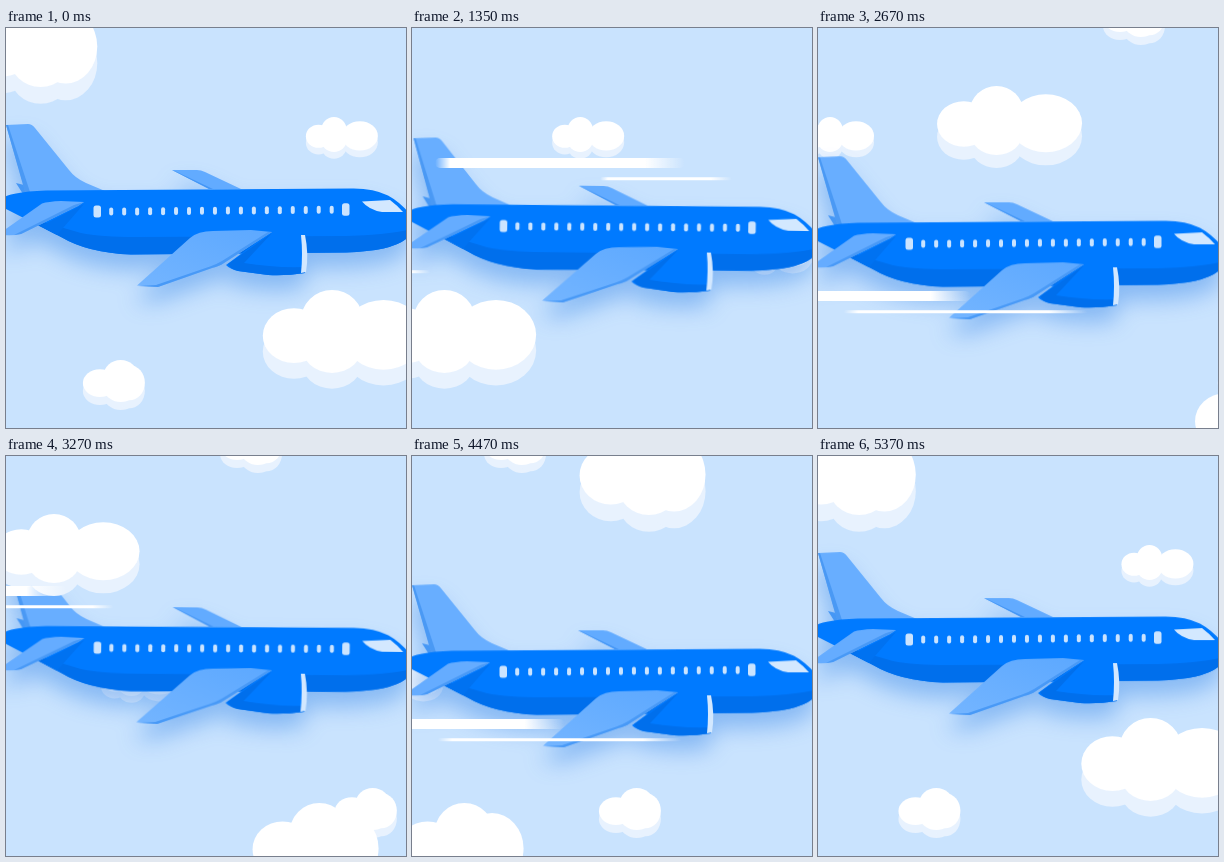
These frames come from a looping animation (400 by 400 pixels, 5.4 s). An HTML page:

```html
<!DOCTYPE html>
<html>
<head>
<meta charset="utf-8">
<style>
html, body { margin: 0; width: 100%; height: 100%; overflow: hidden; background: #c9e3fe; }
svg { display: block; width: 100vw; height: 100vh; }
#plane { filter: drop-shadow(-2px 15px 11px rgba(0, 100, 225, .33)); }
</style>
</head>
<body>
<svg viewBox="0 0 400 400">
  <defs>
    <linearGradient id="fade">
      <stop offset="0" stop-color="#fff" stop-opacity="0"/>
      <stop offset=".06" stop-color="#fff"/>
      <stop offset=".84" stop-color="#fff"/>
      <stop offset="1" stop-color="#fff" stop-opacity="0"/>
    </linearGradient>
    <linearGradient id="wing" x1="0" y1="1" x2="1" y2="0">
      <stop offset="0" stop-color="#74b5ff"/>
      <stop offset="1" stop-color="#5ca8ff"/>
    </linearGradient>
    <clipPath id="hull">
      <path d="M-4 171Q2 164 40 162.5L345 160.5Q367 160 382 167.5Q394 174 404 186Q411 197 400 211Q385 223 340 224.5L125 226.5Q82 225 55 209L0 181Q-6 177-4 171Z"/>
    </clipPath>
  </defs>
  <g id="far"></g>
  <g id="plane">
    <path fill="#4597f5" d="M10 155L18 157L30 166H17Z"/>
    <path fill="#68aeff" d="M0 97L22 96Q26 96 29 100L63 142Q69 150 80 155L99 163L20 166Z"/>
    <path fill="#4a99f4" d="M0 97H2L24 164H19Z"/>
    <path fill="#62abff" d="M166 142H191Q195 142 199 144L235 161H203Z"/>
    <path fill="#4496f5" d="M166 142L169 143L207 161H203Z"/>
    <g clip-path="url(#hull)">
      <rect x="-10" y="150" width="430" height="90" fill="#007aff"/>
      <path fill="#006fec" d="M30 192L75 205Q95 209 130 209L340 208Q385 207 415 199V240H30Z"/>
      <path fill="#0072f1" d="M35 198L78 176L50 208Z"/>
    </g>
    <path fill="#d3e8ff" d="M356 173.5L384 172Q392 178 397 184H376Q363 182 356 173.5Z"/>
    <g id="windows" fill="#cbe4ff">
      <rect x="87.5" y="177.5" width="7.5" height="12" rx="2.5"/>
      <rect x="336" y="175.2" width="7.5" height="12.5" rx="2.5"/>
    </g>
    <path fill="#65acff" d="M-3 203L36 175.5Q42 173.5 55 173L78 174L72 178L15 206Q8 208-3 207Z"/>
    <path fill="#4899f6" d="M78 174L72 178L15 206L8 207L68 177Z"/>
    <path fill="#007aff" d="M220 237L262 206H298Q302 226 299 245Q280 248 262 247L232 243Q224 241 220 237Z"/>
    <path fill="#006fec" d="M222 236L266 205L238 235Q268 240 299 239V245Q280 248 262 247L232 243Q224 241 222 236Z"/>
    <path fill="#d3e8ff" d="M295 207H299Q303 226 300 244L295 245Q297 226 295 207Z"/>
    <path fill="url(#wing)" d="M131 257.5L184 210Q192 203 207 203L245 202L266 204L218 235Q214 238 206 240L152 259Z"/>
    <path fill="#4899f6" d="M266 204L218 235Q214 238 206 240L152 259L132 258L150 257L204 238.5Q211 236 216 233L262 204Z"/>
  </g>
  <g id="near"></g>
  <g id="streaks"></g>
</svg>
<script>
const LOOP = 5400, BOB = 1800, STREAK_SPEED = 1.77;
const $ = id => document.getElementById(id);

function add(parent, tag, attrs) {
  const el = document.createElementNS('http://www.w3.org/2000/svg', tag);
  for (const k in attrs) el.setAttribute(k, attrs[k]);
  return parent.appendChild(el);
}

// A cloud is a left lobe, a peak on its base and a right lobe; peak is a share of the width.
function cloud(w, h, peak, x, y) {
  const layer = w < 100 ? 'far' : 'near', r = .45 * peak;
  const el = add($(layer), 'g');
  const lobes = [[r, .55, r, .33], [peak, .37, r, .37], [peak, .66, r, .34], [.75, .54, .25, .42]];
  for (const [fill, drop] of [['#e8f2fe', .19], ['#fff', 0]])
    for (const [cx, cy, rx, ry] of lobes)
      add(el, 'ellipse', { cx: cx * w, cy: (cy + drop) * h, rx: rx * w, ry: ry * h, fill });
  return { el, x, y, speed: layer == 'far' ? .1183 : .2175 };
}

const clouds = [
  cloud(72, 35, .39, 300, 89),
  cloud(78, 36, .39, 482, 204),
  cloud(62, 42, .61, 77, 332),
  cloud(62, 42, .61, 601, -33),
  cloud(161, 83, .43, 257, 262),
  cloud(145, 69, .41, 700, 58),
  cloud(126, 84, .53, 958, 347),
  cloud(126, 88, .55, 1140, -29)
];

for (let i = 0; i < 18; i++)
  add($('windows'), 'rect', { x: 103.2 + i * 12.97, y: 179.6 - i * .11, width: 4, height: 8, rx: 2 });

// A thick streak reaches the left edge at time t; a thin one follows below, gap pixels behind.
function streak(t, y, h, gap, thin) {
  const el = add($('streaks'), 'g', { fill: 'url(#fade)' });
  add(el, 'rect', { y: y - h / 2, width: 2500 / h, height: h, rx: h / 2 });
  add(el, 'rect', { x: gap, y: y + 14.2, width: thin, height: 3, rx: 1.5 });
  return { el, t };
}

const streaks = [
  streak(270, 203, 10, 190, 130),
  streak(661, 147, 15, 50, 165),
  streak(816, 268, 10, 123, 244),
  streak(1175, 228, 10, 210, 120),
  streak(1364, 135, 10, 165, 132)
];

const move = (el, x, y) => el.setAttribute('transform', `translate(${x} ${y})`);

function draw(now) {
  const t = now % LOOP, phase = t % BOB;

  for (const c of clouds) {
    const span = c.speed * LOOP;
    move(c.el, (c.x - c.speed * t + 200 + span) % span - 200, c.y);
  }

  const a = phase / BOB * 2 * Math.PI;
  const lift = 16.2 * (1 - Math.cos(a)), tilt = .85 * Math.sin(a) ** 2;
  $('plane').setAttribute('transform', `translate(0 ${lift}) rotate(${tilt} 200 200)`);

  for (const s of streaks) move(s.el, (s.t - phase) * STREAK_SPEED, 0);
}

const start = performance.now();
function frame() {
  draw(performance.now() - start);
  requestAnimationFrame(frame);
}
frame();
</script>
</body>
</html>
```
